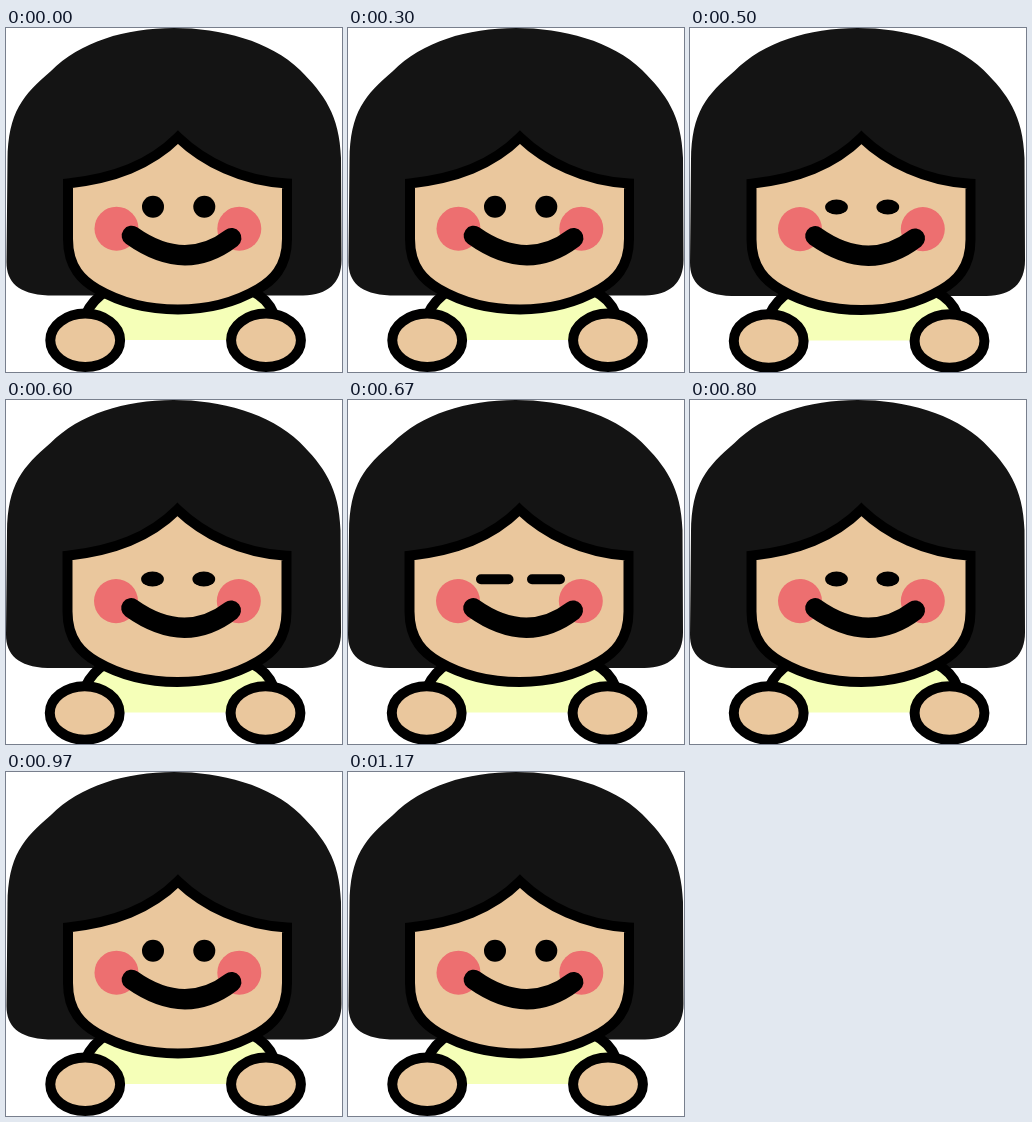
Write an HTML page that moves like this. It is 336 px wide and 344 px high and loops after 1300 ms.

```html
<!DOCTYPE html>
<html lang="en">
<head>
<meta charset="utf-8">
<title>Blinking girl</title>
<style>
  html, body { margin: 0; width: 100%; height: 100%; overflow: hidden; background: #fff; }
  svg { display: block; width: 100vw; height: 100vh; }
</style>
</head>
<body>
<svg viewBox="0 0 336 344">
  <g id="girl" stroke="#000" stroke-width="10">
    <path fill="#141414" stroke="none" d="M168 0C119 0 74 14 45 43C17 67 2 84 1.500 132L0.500 234C0.500 254 12 266 42 267.500H297C322 267 335.500 255 335.500 232L335 130C333.500 87 318 66 294 42C264 13 215 0 168 0Z"/>
    <path fill="#f5ffb8" stroke="none" d="M80 312V286Q88 268 106 262H242Q260 268 267 286V312Z"/>
    <path fill="none" d="M80 286Q86 272 102 262M268 286Q262 271 246 263"/>
    <path fill="#eac79d" d="M62 155.500C108 150.500 144 137 172 109.300C198 134 236 153 281 155.500V211C281 240 266 253 252 261C228 275 200 281.500 172 281.500C144 281.500 115 275 91 261C77 253 62 240 62 211Z"/>
    <g fill="#ed6f70" stroke="none">
      <circle cx="110.500" cy="200.700" r="22"/>
      <circle cx="233.300" cy="200.700" r="22"/>
    </g>
    <path fill="none" stroke-width="20" stroke-linecap="round" d="M125.700 207.700Q179 245.500 225.500 210"/>
    <g id="open" stroke="none">
      <ellipse cx="147" cy="178.700"/>
      <ellipse cx="198.300" cy="178.700"/>
    </g>
    <path id="shut" fill="none" stroke-linecap="round" d="M133.500 178.900H161M184.500 178.900H212.500"/>
    <g fill="#eac79d">
      <ellipse cx="79.200" cy="312.300" rx="34.900" ry="26.700"/>
      <ellipse cx="260" cy="312.300" rx="34.900" ry="26.700"/>
    </g>
  </g>
</svg>
<script>
  const LOOP = 1300;
  const girl = document.getElementById('girl');
  const open = document.getElementById('open');
  const shut = document.getElementById('shut');

  // Vertical eye radius; zero means closed.
  function eyeHeight(t) {
    if (t < 500 || t >= 970) return 11;
    return t >= 670 && t < 800 ? 0 : 7.5;
  }

  function draw(now) {
    const ry = eyeHeight(now % LOOP);
    const blinking = ry < 11;
    for (const eye of open.children) {
      eye.setAttribute('rx', blinking ? 11.4 : 11);
      eye.setAttribute('ry', ry);
    }
    open.style.display = ry ? '' : 'none';
    shut.style.display = ry ? 'none' : '';
    // The whole figure nudges slightly during the blink.
    girl.setAttribute('transform', blinking ? 'translate(-0.5 0) scale(1 1.002)' : '');
  }

  let start;
  function tick(now) {
    start ??= now;
    draw(now - start);
    requestAnimationFrame(tick);
  }
  draw(0);
  requestAnimationFrame(tick);
</script>
</body>
</html>
```
